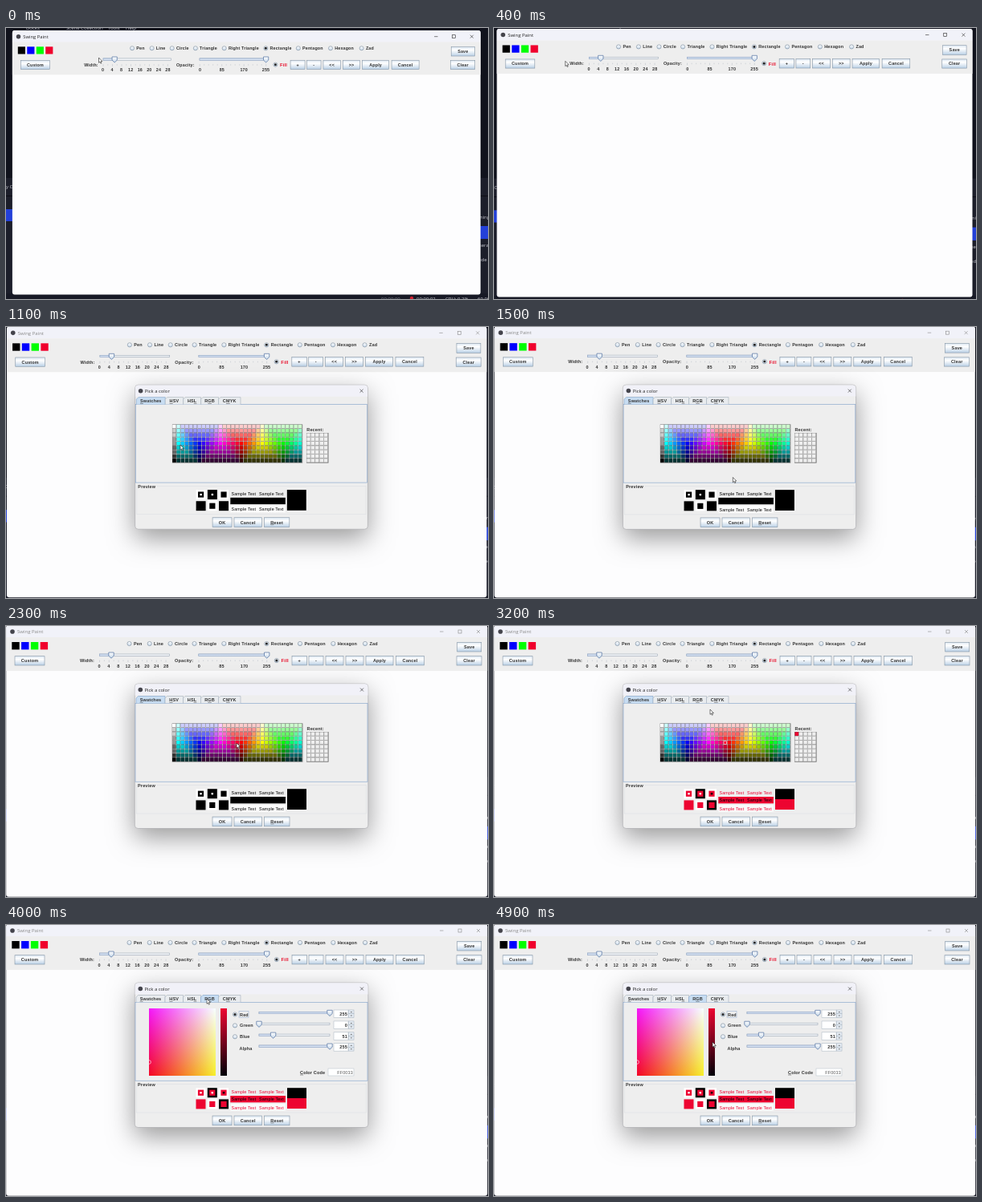
These frames come from a looping animation (600 by 338 pixels, 5 s). An HTML page with a canvas:

```html
<!DOCTYPE html>
<html lang="en">
<head>
<meta charset="utf-8">
<title>Swing Paint</title>
<style>
html, body { margin: 0; width: 100%; height: 100%; overflow: hidden; background: #11131d; }
canvas { display: block; }
</style>
</head>
<body>
<canvas id="stage" width="600" height="338"></canvas>
<script>
const ctx = document.getElementById('stage').getContext('2d');
const LOOP = 5000, RED = '#ed0431', INK = '#333', STEEL = '#8494a4', PANEL = '#eeeeee';
const BOLD = 'bold 5.5px "Liberation Sans", Arial, sans-serif';
const PLAIN = '5.4px "Liberation Sans", Arial, sans-serif';
const TITLE = '6px "Open Sans", "Noto Sans", sans-serif';

const HOME = { x: 285, y: 143 }, START_SCALE = 0.973;

// time, x, y of the pointer tip
const PATH = [
  [0, 115.5, 37], [300, 98, 41], [700, 39, 43], [900, 39, 43], [1100, 217, 147], [1400, 290, 185],
  [1800, 337, 201], [2300, 287, 146], [3000, 287, 146], [3200, 269, 104], [3700, 250, 92],
  [4200, 250, 92], [4800, 269, 170], [4900, 272, 146]
];

function rect(x, y, w, h, fill, stroke) {
  if (fill) { ctx.fillStyle = fill; ctx.fillRect(x, y, w, h); }
  if (stroke) { ctx.strokeStyle = stroke; ctx.lineWidth = 0.6; ctx.strokeRect(x, y, w, h); }
}

function line(x1, y1, x2, y2, color, width = 0.6) {
  ctx.strokeStyle = color;
  ctx.lineWidth = width;
  ctx.beginPath(); ctx.moveTo(x1, y1); ctx.lineTo(x2, y2); ctx.stroke();
}

function disc(x, y, r, fill, stroke) {
  ctx.beginPath(); ctx.arc(x, y, r, 0, Math.PI * 2);
  ctx.fillStyle = fill; ctx.fill();
  if (stroke) { ctx.strokeStyle = stroke; ctx.lineWidth = 0.7; ctx.stroke(); }
}

function text(s, x, y, { font = BOLD, color = INK, align = 'left', gap = 0.16, key = -1 } = {}) {
  ctx.font = font;
  ctx.fillStyle = color;
  ctx.letterSpacing = gap + 'px';
  const left = x - ctx.measureText(s).width * (align === 'center' ? 0.5 : align === 'right' ? 1 : 0);
  ctx.fillText(s, left, y);
  if (key >= 0) {
    const a = left + ctx.measureText(s.slice(0, key)).width;
    line(a, y + 1, a + ctx.measureText(s[key]).width, y + 1, color, 0.5);
  }
}

function ramp(x1, y1, x2, y2, ...stops) {
  const g = ctx.createLinearGradient(x1, y1, x2, y2);
  stops.forEach((c, i) => g.addColorStop(i / (stops.length - 1), c));
  return g;
}

function button(label, x, y, w, h, { down = false, key = -1 } = {}) {
  rect(x, y, w, h, down ? '#a9c0d8' : ramp(0, y, 0, y + h, '#dde8f3', '#ffffff', '#dfe9f3', '#b8cfe5'), STEEL);
  text(label, x + w / 2, y + h / 2 + 2, { align: 'center', key });
}

function radio(label, cx, cy, x, on) {
  disc(cx, cy, 2.6, ramp(0, cy - 2.6, 0, cy + 2.6, '#ffffff', '#c8d9ea'), STEEL);
  if (on) disc(cx, cy, 1.5, '#222');
  text(label, x, cy + 2);
}

function slider(x1, x2, y, at) {
  rect(x1, y - 1.2, x2 - x1, 2.4, '#f4f6f9', '#98a5b3');
  if (at > x1) rect(x1, y - 1.2, at - x1, 2.4, ramp(0, y - 1.2, 0, y + 1.2, '#c3d2e6', '#e6eefa'), '#94a9ca');
}

function thumb(x, y) {
  ctx.beginPath();
  ctx.moveTo(x - 3.2, y - 3.2); ctx.lineTo(x + 3.2, y - 3.2); ctx.lineTo(x + 3.2, y + 1);
  ctx.lineTo(x, y + 4); ctx.lineTo(x - 3.2, y + 1); ctx.closePath();
  ctx.fillStyle = ramp(0, y - 3, 0, y + 4, '#ffffff', '#c3d6e9');
  ctx.fill();
  ctx.strokeStyle = '#5f7ca8'; ctx.lineWidth = 0.8; ctx.stroke();
}

function cross(x, y, color) {
  line(x - 2, y - 2, x + 2, y + 2, color);
  line(x - 2, y + 2, x + 2, y - 2, color);
}

function zoom(k) {
  ctx.setTransform(k, 0, 0, k, HOME.x * (1 - k), HOME.y * (1 - k));
}

function desktop() {
  rect(-20, -20, 640, 380, '#10121c');
  rect(-20, 187, 640, 170, '#1c1e2a');
  rect(-20, 209, 640, 1, '#0c0d15');
  rect(-20, 226, 40, 15, '#2340d8');
  rect(580, 247, 40, 16, '#2340d8');
  const soft = { font: TITLE, color: '#c9cad2', gap: 0 };
  text('Docks', 25, 2, soft);
  text('Scene Collection', 75, 2, soft);
  text('Tools', 127, 2, soft);
  text('Help', 149, 2, soft);
  text('y C', 0, 200, soft);
  ['ming', '', 'nera', 'ode'].forEach((s, i) => text(s, 588, 238 + i * 17.5, soft));
  rect(-20, 331, 640, 30, '#171925');
  text('00:00:00', 467, 339.5, { ...soft, color: '#777a86' });
  disc(505, 337, 2.2, '#d02030');
  text('00:00:02', 511, 339.5, soft);
  text('CPU: 0.2%', 547, 339.5, soft);
  text('60.00', 587, 339.5, soft);
}

function mainWindow(active, pressed) {
  ctx.beginPath(); ctx.roundRect(0.2, -0.8, 599, 338.6, 3);
  ctx.fillStyle = '#fdfdfe'; ctx.fill();
  ctx.beginPath(); ctx.roundRect(0.2, -0.8, 599, 15, [3, 3, 0, 0]);
  ctx.fillStyle = '#f1f2f9'; ctx.fill();
  rect(0.2, 14, 599, 42, PANEL);
  disc(8, 7, 2.8, '#44444c');
  text('Swing Paint', 14, 9.2, { font: TITLE, color: active ? '#222' : '#888', gap: 0 });
  const mark = active ? '#222' : '#888';
  line(540, 7, 544.5, 7, mark);
  rect(563, 5, 4, 4, null, mark);
  cross(588, 7, mark);

  ['#000000', '#0000ff', '#00ff00', '#f0002c'].forEach((c, i) => rect(7.3 + i * 11.8, 20, 9.4, 9.4, c));
  button('Custom', 11, 37.7, 37, 11.3, { down: pressed });
  button('Save', 561.7, 20.3, 30, 11.7);
  button('Clear', 561, 37.7, 31, 11.3);

  const shapes = [['Pen', 153.5], ['Line', 178.7], ['Circle', 204.5], ['Triangle', 234.5], ['Right Triangle', 271.3],
    ['Rectangle', 324.4], ['Pentagon', 366], ['Hexagon', 407.3], ['Zad', 447]];
  for (const [name, x] of shapes) radio(name, x, 22, x + 5.4, name === 'Rectangle');

  text('Width:', 92, 45.3);
  slider(116.5, 203.5, 36.2, 131);
  thumb(131, 36.2);
  for (let i = 0; i <= 28; i += 2) line(116.5 + i * 2.95, 42.5, 116.5 + i * 2.95, i % 4 ? 44 : 45, '#b0b7c0', 0.5);
  for (let i = 0; i <= 28; i += 4) text(String(i), 116 + i * 2.97, 51.8, { align: 'center' });

  text('Opacity:', 210, 45.3);
  slider(239.8, 326, 36.2, 324.5);
  thumb(324.7, 36.2);
  for (let i = 0; i <= 15; i++) line(240 + i * 5.65, 42.5, 240 + i * 5.65, i % 5 ? 44 : 45, '#b0b7c0', 0.5);
  [0, 85, 170, 255].forEach((n, i) => text(String(n), 240.3 + i * 28.1, 51.8, { align: 'center' }));

  radio('', 336.8, 43, 0, true);
  text('Fill', 342.5, 45.4, { color: '#e8112d', font: BOLD.replace('5.5', '6') });
  const tools = [['+', 356, 18.5], ['-', 377, 18], ['<<', 398, 22], ['>>', 423, 22], ['Apply', 448, 34], ['Cancel', 485.5, 35]];
  for (const [name, x, w] of tools) button(name, x, 37.4, w, 11.5);
}

// One channel of the swatch table: full near its own column, falling off by 51 per column.
function channel(col, row, peak) {
  const d = Math.abs(col - peak), dist = Math.min(d, 30 - d);
  const low = Math.max(0, 204 - 51 * row), high = Math.min(255, 255 - 51 * (row - 4));
  return Math.min(high, Math.max(low, 255 - 51 * Math.max(0, dist - 5)));
}

function cells(x, y, cols, rows, w, h, color) {
  rect(x, y, cols * w, rows * h, '#e2e2e2', '#777');
  for (let r = 0; r < rows; r++) for (let c = 0; c < cols; c++) {
    rect(x + c * w, y + r * h, w - 0.5, h - 0.5, '#555');
    rect(x + c * w, y + r * h, w - 0.8, h - 0.8, color(c, r));
  }
}

function swatches(picked) {
  cells(207, 121.7, 31, 9, 5.23, 5.32, (c, r) => {
    if (c) return `rgb(${channel(c, r, 16)},${channel(c, r, 26)},${channel(c, r, 6)})`;
    const g = 255 - 51 * Math.ceil(r / 2);
    return r === 8 ? '#000' : `rgb(${g},${g},${g})`;
  });
  text('Recent:', 374.5, 129.8);
  cells(374.5, 132.3, 5, 7, 5.4, 5.33, (c, r) => picked && !c && !r ? RED : PANEL);
  if (picked) rect(286, 143.7, 3.6, 3.6, null, '#ffffff');
}

function rgbPane() {
  rect(178, 104, 83, 84, ramp(178, 0, 261, 0, '#f4061c', '#f6f020'));
  ctx.globalCompositeOperation = 'lighter';
  rect(178, 104, 83, 84, ramp(0, 104, 0, 188, '#0010e0', '#000008'));
  ctx.globalCompositeOperation = 'source-over';
  ctx.beginPath(); ctx.arc(178, 171, 2.4, -Math.PI / 2, Math.PI / 2);
  ctx.strokeStyle = '#ffffff'; ctx.lineWidth = 0.6; ctx.stroke();
  rect(267, 104, 8, 84, ramp(0, 104, 0, 188, RED, '#000008'));

  [['Red', 255], ['Green', 0], ['Blue', 51], ['Alpha', 255]].forEach(([name, value], i) => {
    const y = 111.5 + i * 13.9, at = 315 + value / 255 * 88;
    if (i < 3) radio(name, 285, y, 291, !i); else text(name, 290.5, y + 2.8);
    slider(315, 403, y - 2, at);
    thumb(at, y - 2);
    rect(408, y - 5.5, 18, 9.5, '#fff', '#b4bec8');
    text(String(value), 425, y + 1.2, { align: 'right' });
    rect(426.5, y - 5.5, 6.5, 4.7, '#e6edf5', '#aab6c2');
    rect(426.5, y - 0.8, 6.5, 4.7, '#e6edf5', '#aab6c2');
    line(428.7, y - 2.9, 430.9, y - 2.9, '#444', 0.7);
    line(428.7, y + 1.5, 430.9, y + 1.5, '#444', 0.7);
  });
  rect(290, 107.6, 12, 7.6, null, '#9db4d2');
  text('Color Code', 366, 186, { key: 0 });
  rect(401, 179, 32, 9, '#fff', '#c0c8d0');
  text('FF0033', 431.8, 185.8, { font: PLAIN, align: 'right', color: '#555' });
}

function preview(color) {
  rect(162.5, 198.5, 286, 35.5, null, '#dcdfe3');
  rect(163, 196, 24, 6, PANEL);
  text('Preview', 164, 200.8);
  const nested = (x, y, ...fills) => fills.forEach((f, i) => rect(x + i * 2.4, y + i * 2.4, 12 - i * 4.8, 12 - i * 4.8, f));
  nested(236.5, 203.2, '#fff', color, '#fff');
  nested(250.8, 203.2, '#000', color, '#fff');
  nested(265, 203.2, '#fff', color, '#000');
  nested(236.5, 217.4, color);
  nested(250.8, 217.4, '#fff', color);
  nested(265, 217.4, '#000', color);
  rect(279.3, 213, 68.7, 8.3, color);
  rect(279.3, 223, 68.7, 8.6, '#fbfbfb');
  for (const x of [280.5, 315]) {
    text('Sample Text', x, 210.4, { font: PLAIN, color, gap: 0.1 });
    text('Sample Text', x, 219.2, { font: PLAIN, color: '#000', gap: 0.1 });
    text('Sample Text', x, 229.7, { font: PLAIN, color, gap: 0.1 });
  }
  rect(350, 203.2, 24, 13, '#000');
  rect(350, 216, 24, 13, color);
}

function dialog(picked, tab) {
  ctx.save();
  ctx.shadowColor = 'rgba(0,0,0,0.4)';
  ctx.shadowBlur = 32;
  ctx.shadowOffsetY = 11;
  ctx.beginPath(); ctx.roundRect(160.3, 72, 290.5, 180.5, 4);
  ctx.fillStyle = PANEL; ctx.fill();
  ctx.restore();
  ctx.strokeStyle = '#a5a5aa'; ctx.lineWidth = 0.6; ctx.stroke();
  ctx.beginPath(); ctx.roundRect(160.6, 72.3, 289.9, 14.2, [4, 4, 0, 0]);
  ctx.fillStyle = '#f1f1f8'; ctx.fill();
  disc(167.3, 79.5, 2.8, '#44444c');
  text('Pick a color', 172.5, 81.7, { font: TITLE, color: '#222', gap: -0.05 });
  cross(443, 79.5, '#222');

  rect(161, 96.3, 289, 97.9, PANEL, '#7e9fc9');
  const tabs = [['Swatches', 162, 36, 0], ['HSV', 198, 22.5, 0], ['HSL', 220.5, 22, 2], ['RGB', 242.5, 22, 1], ['CMYK', 264.5, 27.5, 1]];
  tabs.forEach(([name, x, w, key], i) => {
    ctx.beginPath();
    ctx.moveTo(x, 96.3); ctx.lineTo(x, 90); ctx.lineTo(x + 2.5, 87.5); ctx.lineTo(x + w, 87.5); ctx.lineTo(x + w, 96.3);
    ctx.fillStyle = i === tab ? '#c8ddf2' : '#e9ecef'; ctx.fill();
    ctx.strokeStyle = i === tab ? '#7e9fc9' : '#a4b0bd'; ctx.lineWidth = 0.6; ctx.stroke();
    text(name, x + w / 2, 94.3, { align: 'center', key });
  });
  if (tab) rgbPane(); else swatches(picked);
  preview(picked ? RED : '#000');
  button('OK', 257, 238, 24, 11.8);
  button('Cancel', 284, 238, 34.5, 11.8);
  button('Reset', 321.5, 238, 31.5, 11.8, { key: 0 });
}

function pointer(t) {
  const i = Math.max(1, PATH.findIndex(p => p[0] >= t));
  const [t1, x1, y1] = PATH[i - 1], [t2, x2, y2] = PATH[i];
  const u = (t - t1) / (t2 - t1), e = u * u * (3 - 2 * u);
  const x = x1 + (x2 - x1) * e, y = y1 + (y2 - y1) * e;
  ctx.beginPath();
  [[0, 0], [0, 6.3], [1.4, 5], [2.4, 7.2], [3.4, 6.8], [2.5, 4.6], [4.4, 4.5]].forEach(([a, b]) => ctx.lineTo(x + a, y + b));
  ctx.closePath();
  ctx.fillStyle = '#fff'; ctx.fill();
  ctx.strokeStyle = '#222'; ctx.lineWidth = 0.6; ctx.stroke();
}

function draw(now) {
  const t = Math.floor(now % LOOP / 100) * 100;
  const k = t < 1700 ? 1 - (1 - START_SCALE) * Math.exp(-t / 480) : 1;
  zoom(k / START_SCALE);
  desktop();
  zoom(k);
  mainWindow(t < 900, t >= 700 && t < 1000);
  if (t >= 900) {
    ctx.globalAlpha = Math.min(1, (t - 800) / 200);
    dialog(t >= 2500, t >= 3800 ? 3 : 0);
    ctx.globalAlpha = 1;
  }
  zoom(1);
  pointer(t);
}

const begun = performance.now();
function tick() {
  draw(performance.now() - begun);
  requestAnimationFrame(tick);
}
tick();
</script>
</body>
</html>
```
